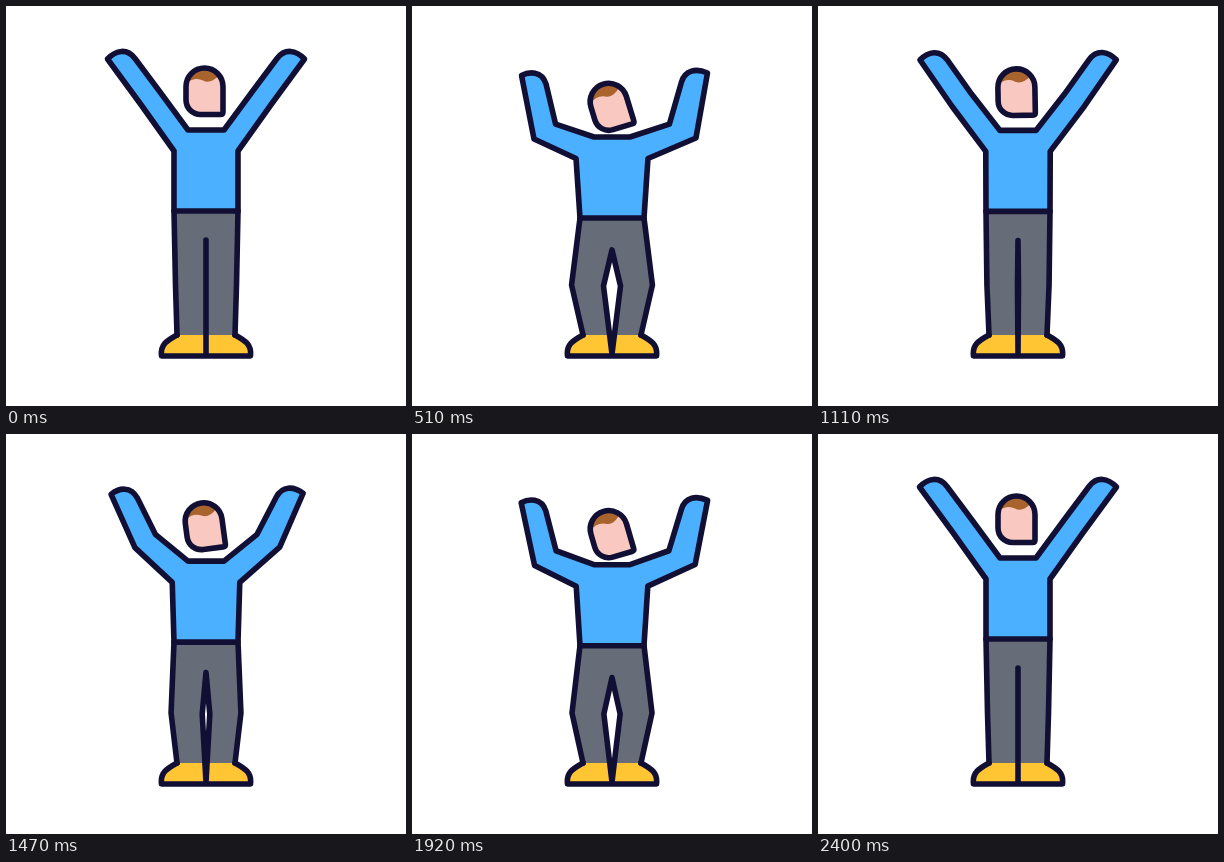
These frames come from a looping animation (400 by 400 pixels, 4.43 s). An HTML page:

```html
<!DOCTYPE html>
<html lang="en">
<head>
<meta charset="utf-8">
<title>Cheering man</title>
<style>
  html, body { margin: 0; height: 100%; overflow: hidden; background: #fff; }
  svg { display: block; width: 100%; height: 100%; }
  .line { stroke: #120f35; stroke-width: 5.6; stroke-linecap: round; stroke-linejoin: round; }
</style>
</head>
<body>
<svg viewBox="0 0 400 400">
  <path id="legs" fill="#666d78"/>
  <path fill="#ffc533" d="M171 329H229C238 334 246 338 244.5 350H155.5C154 338 162 334 171 329Z"/>
  <path id="seams" class="line" fill="none"/>
  <path class="line" fill="none" d="M171 329C162 334 154 338 155.5 350H244.5C246 338 238 334 229 329"/>
  <g id="head">
    <path id="face" fill="#f9c8c1" d="M217 106V80.500A18.500 18.500 0 0 0 180 80.500V94A14.500 14.500 0 0 0 194.500 108.500H214.500Q217 108.500 217 106Z"/>
    <path fill="#a9632c" d="M180.500 77Q189 70.500 197 74.500Q204 78.500 213 69.500A18.500 18.500 0 0 0 180.500 77Z"/>
    <path class="line" fill="none" d="M217 106V80.500A18.500 18.500 0 0 0 180 80.500V94A14.500 14.500 0 0 0 194.500 108.500H214.500Q217 108.500 217 106Z"/>
  </g>
  <path id="body" class="line" fill="#4bb0ff"/>
</svg>
<script>
const LOOP = 4430, BOUNCE = 1200, ACTIVE = 2400, STEP = 30;

// Each part: [standing pose, crouched pose]
const poses = {
  body: [
    "M101.5 53C110 44 121 42 129 52.5L154 86L182 124L218 124L246 86L271 52.5" +
    "C279 42 290 44 298.5 53L265.5 98L232 145L232 205L168 205L168 145L134.5 98Z",
    "M110 70.4C117.4 66.8 130.3 66 134.3 79.4L143 120L182 131.4L218 131.4L258 120L269.4 77.3" +
    "C272.7 65.2 283.7 63 295.3 67.8L285 134L236.2 152.9L232 212.4L168 212.4L163.8 152.9L121.3 135Z"
  ],
  legs: [
    "M168 205L169.5 279L171 329L200 329L200 280L200 234L200 280L200 329L229 329L230.5 279L232 205Z",
    "M168 212.4L159 279L171 329L197.5 329L191 280L200 244.5L209 280L202.5 329L229 329L241 279L232 212.4Z"
  ],
  seams: [
    "M168 205L169.5 279L171 329M232 205L230.5 279L229 329M200 348L200 280L200 234L200 280L200 348",
    "M168 212.4L159 279L171 329M232 212.4L241 279L229 329M200 348L191 280L200 244.5L209 280L200 348"
  ]
};

const el = id => document.getElementById(id);
const mix = (a, b, p) => a + (b - a) * p;

function morph([from, to], p) {
  const ends = to.match(/[\d.]+/g);
  let i = 0;
  return from.replace(/[\d.]+/g, n => mix(+n, +ends[i++], p).toFixed(2));
}

function draw(now) {
  const t = Math.min(Math.floor(now % LOOP / STEP) * STEP, ACTIVE);
  const p = (1 - Math.cos(2 * Math.PI * t / BOUNCE)) / 2;
  for (const id in poses) el(id).setAttribute("d", morph(poses[id], p));
  el("head").setAttribute("transform",
    `translate(${-0.4 * p} ${15.9 * p}) rotate(${-18 * p} 198.5 85.5)`);
}

const start = performance.now();
function tick() {
  draw(performance.now() - start);
  requestAnimationFrame(tick);
}
tick();
</script>
</body>
</html>
```
